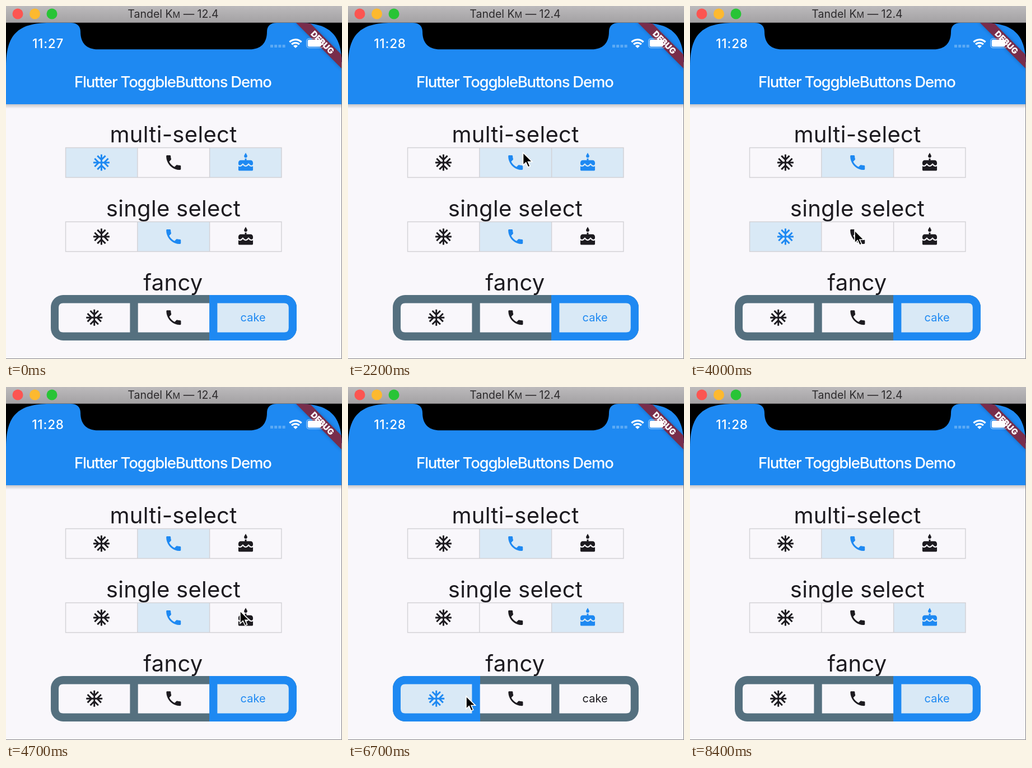
Animation of 600x629 px, one loop 8.5 s. Source, as an HTML page:

```html
<!DOCTYPE html>
<html lang="en">
<head>
<meta charset="utf-8">
<title>Toggle buttons demo</title>
<style>
  html, body { margin: 0; width: 100%; height: 100%; overflow: hidden; background: #f9f7fb; }
  svg { display: block; }
  text { font-family: Inter, Roboto, sans-serif; text-anchor: middle; }
  .heading { font-size: 40px; letter-spacing: .3px; fill: #1d1b20; }
</style>
</head>
<body>
<svg id="stage" width="600" height="629" viewBox="0 0 600 629">
  <defs>
    <linearGradient id="chrome" x2="0" y2="1">
      <stop stop-color="#bcbabc"/><stop offset="1" stop-color="#a3a1a3"/>
    </linearGradient>
    <linearGradient id="shade" x2="0" y2="1">
      <stop stop-color="#000" stop-opacity=".2"/><stop offset="1" stop-color="#000" stop-opacity="0"/>
    </linearGradient>
    <clipPath id="screen">
      <path d="M0 629V108C0 51 21 30 78 30H522C579 30 600 51 600 108V629Z"/>
    </clipPath>
    <clipPath id="frame"><rect x="80" y="515" width="439" height="81" rx="22"/></clipPath>
    <filter id="soft" x="-20%" y="-60%" width="140%" height="220%"><feGaussianBlur stdDeviation="3"/></filter>
    <g id="flake" fill="none" stroke="currentColor" stroke-width="2"></g>
    <path id="phone" fill="currentColor" d="M6.62 10.79c1.44 2.83 3.76 5.14 6.59 6.59l2.2-2.2c.27-.27.67-.36 1.02-.24 1.12.37 2.33.57 3.57.57.55 0 1 .45 1 1V20c0 .55-.45 1-1 1-9.39 0-17-7.61-17-17 0-.55.45-1 1-1h3.5c.55 0 1 .45 1 1 0 1.25.2 2.45.57 3.57.11.35.03.74-.25 1.02z"/>
    <g id="cake" fill="currentColor">
      <path d="M12 6c1.11 0 2-.9 2-2 0-.38-.1-.73-.29-1.03L12 0l-1.71 2.97c-.19.3-.29.65-.29 1.03 0 1.1.9 2 2 2z"/>
      <path d="M16.6 15.99l-1.07-1.07-1.08 1.07c-1.3 1.3-3.58 1.31-4.89 0l-1.07-1.07-1.09 1.07C6.75 16.64 5.88 17 4.96 17c-.73 0-1.4-.23-1.96-.61V21c0 .55.45 1 1 1h16c.55 0 1-.45 1-1v-4.61c-.56.38-1.23.61-1.96.61-.92 0-1.79-.36-2.44-1.01z"/>
      <path d="M18 9h-5V7h-2v2H6c-1.66 0-3 1.34-3 3v1.54c0 1.08.88 1.96 1.96 1.96.52 0 1.02-.2 1.38-.57l2.14-2.13 2.13 2.13c.74.74 2.03.74 2.77 0l2.14-2.13 2.13 2.13c.37.37.86.57 1.38.57 1.08 0 1.96-.88 1.96-1.96V12c0-1.66-1.34-3-3-3z"/>
    </g>
  </defs>

  <!-- phone screen -->
  <path d="M0 30H600V120H0Z"/>
  <g clip-path="url(#screen)">
    <path fill="#f9f7fb" d="M0 170H600V629H0Z"/>
    <path fill="url(#shade)" d="M0 175H600V183H0Z"/>
    <path fill="#1e89f2" d="M0 30H600V175H0Z"/>
    <g transform="translate(600 30) rotate(45)">
      <path filter="url(#soft)" opacity=".25" d="M-59 40.6H59V58H-59Z"/>
      <path fill="#782d4b" d="M-59 40.6H59V58H-59Z"/>
      <text y="54.6" font-size="14.8" font-weight="900" fill="#fff">DEBUG</text>
    </g>
  </g>
  <path d="M116 30C127 30 133 36 133 46C133 66 144 77.3 164 77.3H435C455 77.3 466 66 466 46C466 36 472 30 483 30Z"/>

  <!-- status bar -->
  <text id="clock" x="75" y="74.5" font-size="22.5" font-weight="500" letter-spacing=".8" fill="#fff"></text>
  <path stroke="#fff" stroke-opacity=".28" stroke-width="5" stroke-dasharray="5 2.2" d="M472 71.5H498.6"/>
  <g fill="none" stroke="#fff" stroke-width="3.4">
    <path d="M506.5 64.2A15 15 0 0 1 527.5 64.2M510.2 68.4A9.6 9.6 0 0 1 523.8 68.4"/>
    <path fill="#fff" stroke="none" d="M517 75L512.9 71A6 6 0 0 1 521.1 71Z"/>
  </g>
  <rect x="536.8" y="58" width="30" height="16.5" rx="4.5" fill="none" stroke="#fff" stroke-opacity=".45" stroke-width="1.5"/>
  <rect x="538.8" y="60" width="24" height="12.5" rx="2.5" fill="#fff"/>
  <text x="297.8" y="144.5" font-size="27.5" font-weight="500" letter-spacing="-1.2" fill="#fff">Flutter ToggbleButtons Demo</text>

  <!-- window chrome -->
  <path fill="url(#chrome)" d="M0 0H600V30H0Z"/>
  <path stroke="#757375" d="M0 29.5H600"/>
  <circle cx="21" cy="14" r="9.5" fill="#fc5551"/>
  <circle cx="51.5" cy="14" r="9.5" fill="#fdb92f"/>
  <circle cx="82" cy="14" r="9.5" fill="#28c436"/>
  <text x="298.5" y="21" font-size="19.5" fill="#2c2a2c">Tandel K<tspan font-size="15">M</tspan> — 12.4</text>
  <path fill="none" stroke="#858387" d="M599.5 100V628.5H0"/>

  <!-- content -->
  <text class="heading" x="299" y="243">multi-select</text>
  <text class="heading" x="299" y="375">single select</text>
  <text class="heading" x="298.5" y="507">fancy</text>
  <g clip-path="url(#frame)">
    <path fill="#55707f" d="M80 515H519V596H80Z"/>
    <rect id="accent" y="515" width="156" height="81" fill="#1e89f2"/>
  </g>
  <g id="cells"></g>
  <path id="cursor" stroke="#fff" stroke-width="1.6" d="M0 0V22.5L5.2 17.6L9 26L12.6 24.4L9 16.3H16.3Z"/>
</svg>

<script>
const LOOP = 8500, STEP = 100;
const BLUE = '#1e89f2', INK = '#1d1b20', PAPER = '#f9f7fb', TINT = '#d9e9f6';
const icons = ['flake', 'phone', 'cake'];
const $ = id => document.getElementById(id);

function add(parent, tag, attrs) {
  const node = document.createElementNS('http://www.w3.org/2000/svg', tag);
  set(node, attrs);
  return parent.appendChild(node);
}
function set(node, attrs) {
  for (const key in attrs) node.setAttribute(key, attrs[key]);
}

for (let turn = 0; turn < 4; turn++) {
  add($('flake'), 'path', {
    d: 'M12 12H22M20.36 7.05L15.41 12L20.36 16.95',
    transform: `rotate(${turn * 90} 12 12)`
  });
}

const rows = [
  { y: 252, height: 54, left: 106, pitch: 128.8, width: 128.8, iconY: 279, start: [1, 0, 1] },
  { y: 384, height: 54, left: 106, pitch: 128.8, width: 128.8, iconY: 411, start: [0, 1, 0] },
  { y: 529.5, height: 52, left: 94, pitch: 141.7, width: 127.4, iconY: 555.2, start: [0, 0, 1], fancy: true }
];

// Inner cell of the thick frame: only its outer side is rounded.
function fancyShape(x, y, w, h, i) {
  const l = i === 0 ? 8 : 0, r = i === 2 ? 8 : 0;
  return `M${x + l} ${y}H${x + w - r}q${r} 0 ${r} ${r}V${y + h - r}q0 ${r} ${-r} ${r}` +
    `H${x + l}q${-l} 0 ${-l} ${-l}V${y + l}q0 ${-l} ${l} ${-l}Z`;
}

for (const row of rows) {
  row.cells = icons.map((icon, i) => {
    const x = row.left + i * row.pitch, { y, width, height } = row;
    const cx = x + width / 2, cell = {};
    cell.fill = add($('cells'), 'path', {
      d: row.fancy ? fancyShape(x, y, width, height, i) : `M${x} ${y}h${width}v${height}h${-width}Z`
    });
    if (row.fancy) {
      const clip = add($('cells'), 'svg', { x, y, width, height, viewBox: `${x} ${y} ${width} ${height}` });
      cell.splash = add(clip, 'circle', { fill: '#ffdd1f' });
    }
    if (row.fancy && i === 2) {
      cell.label = add($('cells'), 'text', { x: cx, y: 562, 'font-size': 20, fill: 'currentColor' });
      cell.label.textContent = 'cake';
    } else {
      cell.label = add($('cells'), 'use', {
        href: '#' + icon, transform: `translate(${cx} ${row.iconY}) scale(1.449) translate(-12 -12)`
      });
    }
    return cell;
  });
  if (!row.fancy) {
    const { left, y, height, pitch } = row;
    add($('cells'), 'path', {
      fill: 'none', stroke: '#d2d1d5', 'stroke-width': 1.4,
      d: `M${left + .5} ${y + .5}h${pitch * 3 - 1}v${height - 1}h${1 - pitch * 3}ZM${left + pitch} ${y}v${height}M${left + pitch * 2} ${y}v${height}`
    });
  }
}

// time, row, button
const clicks = [
  [1050, 0, 1], [1750, 0, 0], [2550, 0, 2],
  [3500, 1, 0], [4100, 1, 1], [4750, 1, 2],
  [5550, 2, 1], [6250, 2, 0], [7250, 2, 2]
];
// time, x, y of the pointer tip
const path = [
  [400, 604, 330], [1000, 281, 261], [1350, 281, 261], [1700, 166, 268],
  [1900, 166, 268], [2450, 424, 256], [2650, 424, 256], [3406, 165, 394],
  [3600, 165, 394], [4000, 294, 400], [4200, 294, 400], [4600, 418, 399],
  [4900, 418, 399], [5400, 333, 533], [5700, 333, 533], [6150, 211, 551],
  [6700, 211, 551], [7150, 442, 548], [7400, 442, 548], [8000, 604, 480]
];

function pointer(t) {
  const next = path.findIndex(p => p[0] > t);
  if (next < 1) return [-99, -99];
  const [t0, x0, y0] = path[next - 1], [t1, x1, y1] = path[next];
  const u = (t - t0) / (t1 - t0), k = u * u * (3 - 2 * u);
  return [x0 + (x1 - x0) * k, y0 + (y1 - y0) * k];
}

function mix(from, to, k) {
  return `color-mix(in srgb, ${to} ${k * 100}%, ${from})`;
}

function draw(t) {
  const state = rows.map(row => [...row.start]);
  const wordChange = { time: -LOOP, from: 1 };
  for (const cell of rows[2].cells) set(cell.splash, { r: 0 });

  for (const [time, r, i] of clicks) {
    if (time > t) break;
    const before = state[2][2];
    if (r === 0) state[r][i] ^= 1;
    else state[r] = state[r].map((_, j) => +(j === i));
    if (state[2][2] !== before) Object.assign(wordChange, { time, from: before });

    const age = (t - time) / 400;
    if (rows[r].fancy && age < 1) {
      const [cx, cy] = pointer(time);
      set(rows[r].cells[i].splash, {
        cx, cy: cy + 3, r: 5 + 70 * Math.max(0, age - .125),
        opacity: Math.min(1, (1 - age) * 1.6)
      });
    }
  }

  rows.forEach((row, r) => row.cells.forEach((cell, i) => {
    const on = state[r][i];
    set(cell.fill, { fill: on ? TINT : PAPER });
    cell.label.style.color = on ? BLUE : INK;
  }));

  // The word eases between colours; icons switch at once.
  const k = Math.min(1, Math.max(0, (t - wordChange.time - 50) / 200));
  const tone = on => on ? BLUE : INK;
  rows[2].cells[2].label.style.color = mix(tone(wordChange.from), tone(state[2][2]), k);

  set($('accent'), { x: 80 + 141.5 * state[2].indexOf(1) });
  $('clock').textContent = t < 600 ? '11:27' : '11:28';
  set($('cursor'), { transform: `translate(${pointer(t)})` });
}

const begin = performance.now();
function tick() {
  const t = (performance.now() - begin) % LOOP;
  draw(Math.floor(t / STEP) * STEP);
  requestAnimationFrame(tick);
}
tick();
</script>
</body>
</html>
```
